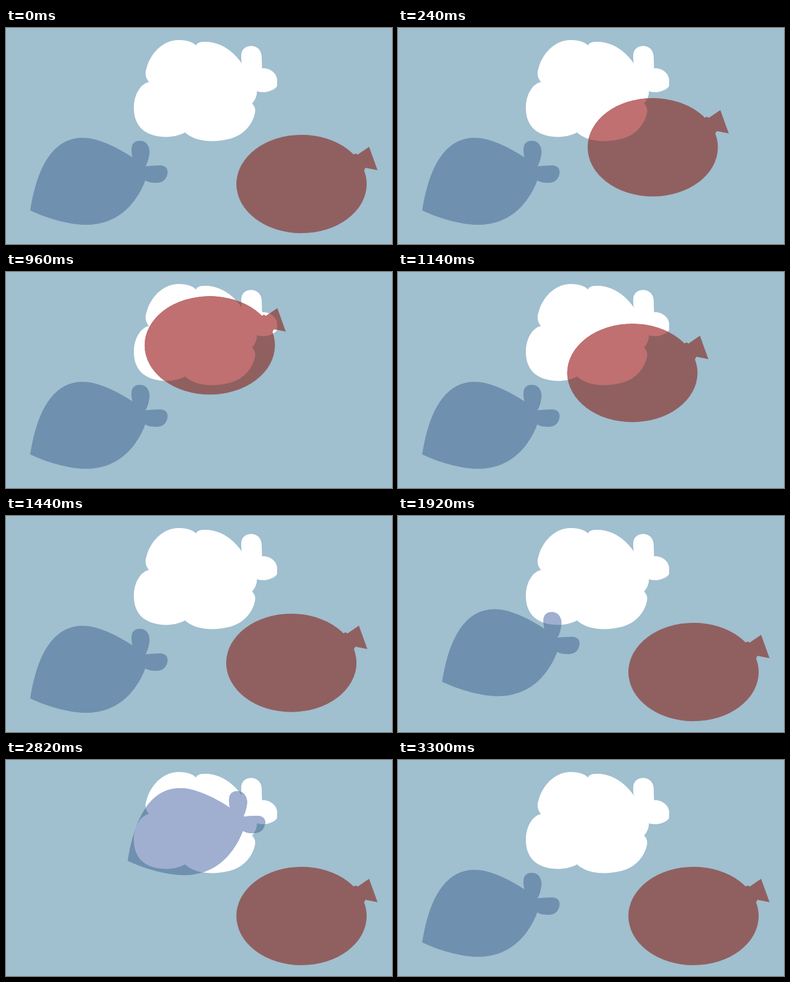
Recreate the animation shown at these times as an HTML page. Size 640 by 360 pixels, loop 3.6 s.

```html
<!DOCTYPE html>
<html lang="en">
<head>
<meta charset="utf-8">
<title>Balloon and leaf over a cloud</title>
<style>
  html, body { margin: 0; width: 100%; height: 100%; overflow: hidden; background: #a0bfcf; }
  svg { display: block; width: 100%; height: 100%; }
</style>
</head>
<body>
<svg viewBox="0 0 640 360">
  <defs>
    <path id="cloud" d="M237 90C231 83 230 75 233 67C239 43 260 20 286 20C299 20 309 23 315 29
      C318 23 325 23 332 23C357 24 377 39 391 59C390 54 390 50 390 46C390 36 397 30 406 30
      C418 30 424 38 424 50L424.5 67C437 66 449 75 449.5 86V96C449.5 100 438 107 427 107
      C422 107 418 106 416 105.5C416 114 413 120 408 126C412 130 414 135 413 140
      C411 155 399 174 379 182C369 186 355 188.5 341 188.5C322 188.5 306 183 297 174
      C288 179 276 181.5 265 181.5C232 181 212 165 212 133C212 111 223 93 237 90Z"/>
    <path id="leaf" d="M40 304C52 228 80 183 127 183C150 183 180 196 209.5 215.5
      C208 208 207.5 203 208.5 198C210 191 215 188 222 188C232 188 238 196 238 207
      C237 217 235 224 231.5 230.5C238 230 246 229 255 229C264 229 268 234 268 240
      C267 251 262 258 248 258C241 258 236 257 231 254C213 300 180 328 133 328
      C105 328 70 318 40 304Z"/>
    <g id="balloon">
      <ellipse cx="490" cy="260" rx="108" ry="82"/>
      <path d="M576 211L580 209L583 211L602 198L616 237L596 233L594 237L576 232Z"/>
    </g>
    <clipPath id="inCloud"><use href="#cloud"/></clipPath>
  </defs>
  <rect width="640" height="360" fill="#a0bfcf"/>
  <use href="#cloud" fill="#fff"/>
  <use class="leaf" href="#leaf" fill="#6f90af"/>
  <use class="balloon" href="#balloon" fill="#906060"/>
  <g clip-path="url(#inCloud)">
    <use class="leaf" href="#leaf" fill="#a0afd0"/>
    <use class="balloon" href="#balloon" fill="#c07070"/>
  </g>
</svg>
<script>
const LOOP = 3600, TICK = 60;

// Each shape glides to (dx, dy) and back; keys are [time, share of the way].
const moves = [
  { name: 'balloon', dx: -169, dy: -153, keys: [[0, 0], [600, 1], [900, 1], [1500, 0], [LOOP, 0]] },
  { name: 'leaf', dx: 182, dy: -153, keys: [[0, 0], [1800, 0], [2460, 1], [2760, 1], [3300, 0], [LOOP, 0]] }
];
for (const m of moves) m.parts = document.querySelectorAll('.' + m.name);

function valueAt(keys, t) {
  const i = keys.findIndex(k => k[0] > t);
  const [t0, v0] = keys[i - 1], [t1, v1] = keys[i];
  return v0 + (v1 - v0) * (t - t0) / (t1 - t0);
}

function draw() {
  const t = Math.floor(performance.now() % LOOP / TICK) * TICK;
  for (const { dx, dy, keys, parts } of moves) {
    const v = valueAt(keys, t);
    for (const p of parts) p.setAttribute('transform', `translate(${dx * v} ${dy * v})`);
  }
  requestAnimationFrame(draw);
}
draw();
</script>
</body>
</html>
```
